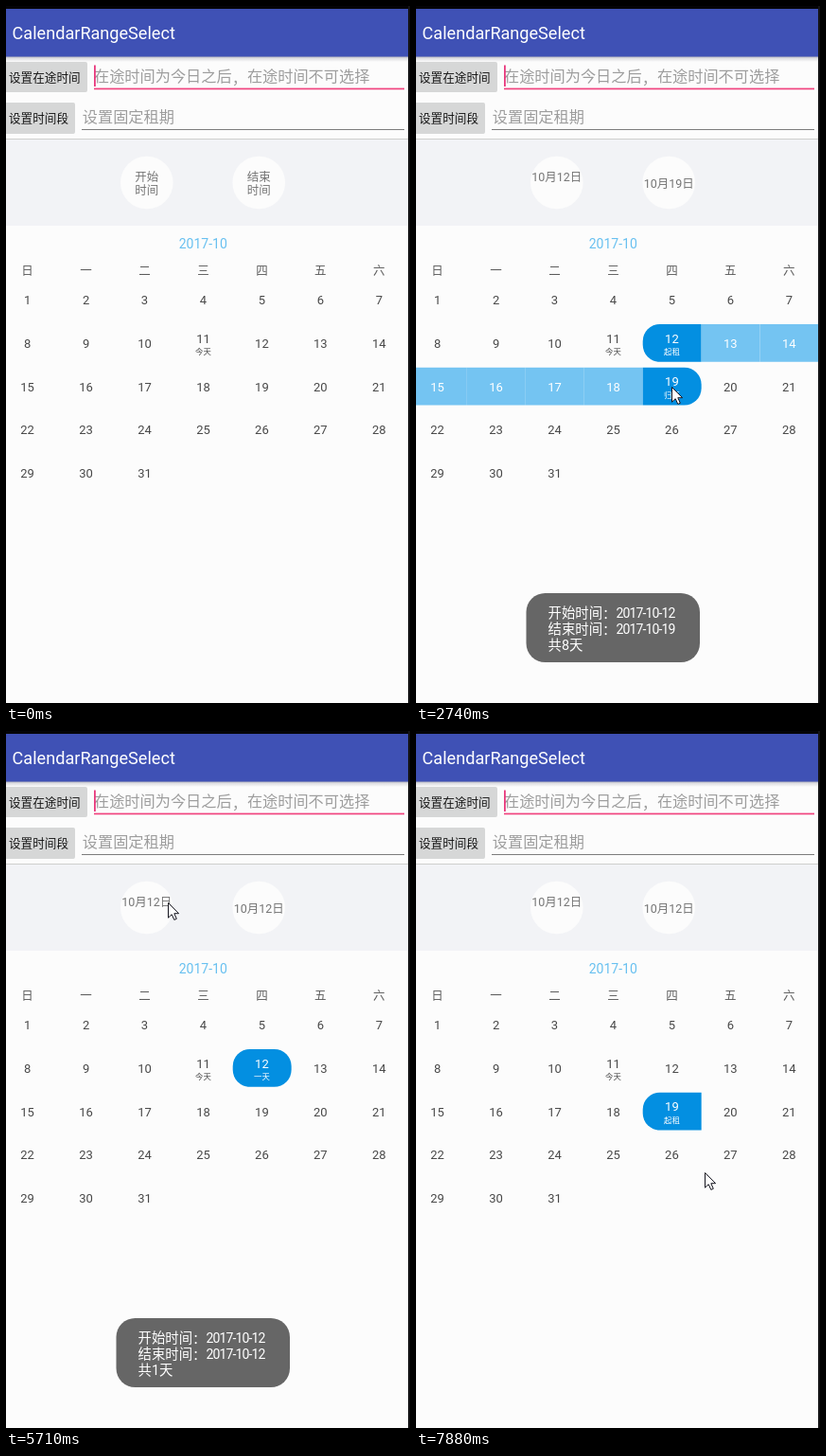
These frames come from a looping animation (427 px wide and 736 px high, 8 s). An HTML page:

```html
<!DOCTYPE html>
<html lang="zh-CN">
<head>
<meta charset="utf-8">
<title>CalendarRangeSelect</title>
<style>
html, body { margin: 0; width: 100%; height: 100%; overflow: hidden; background: #fcfcfc; }
svg { display: block; width: 427px; height: 736px; }
text { font-family: Roboto, "Noto Sans CJK SC", "Noto Sans CJK", sans-serif; white-space: pre; }
.btn { font-weight: 500; }
.date { font-size: 14px; letter-spacing: -.88px; }
.mid { font-family: "Noto Sans CJK TC", "Noto Sans CJK", sans-serif; baseline-shift: -.1em; }
</style>
</head>
<body>
<svg viewBox="0 0 427 736" xmlns="http://www.w3.org/2000/svg">
  <defs>
    <linearGradient id="shade" x2="0" y2="1">
      <stop offset="0" stop-color="#a9abb4"/>
      <stop offset=".35" stop-color="#dcdce0"/>
      <stop offset="1" stop-color="#fcfcfc"/>
    </linearGradient>
  </defs>
  <rect width="427" height="736" fill="#fcfcfc"/>
  <rect y="53" width="425" height="6" fill="url(#shade)"/>
  <rect y="3" width="425" height="50.5" fill="#3f51b5"/>
  <rect x="-4" y="59" width="90" height="32" rx="2" fill="#d6d7d7"/>
  <rect x="-4" y="102" width="77" height="33" rx="2" fill="#d6d7d7"/>
  <rect x="93" y="86.6" width="328" height="1.7" fill="#f0437f"/>
  <rect x="80" y="130" width="341" height="1" fill="#7c7c7c"/>
  <rect y="141" width="425" height="91" fill="#f2f3f6"/>
  <rect y="140" width="425" height="1" fill="#cfcfcd"/>
  <circle cx="148.8" cy="186.5" r="27.8" fill="#fcfcfc"/>
  <circle cx="267.2" cy="186.5" r="27.8" fill="#fcfcfc"/>
  <g id="labels"></g>
  <g id="bounds"></g>
  <g id="cells"></g>
  <g id="days"></g>
  <g id="toasts"></g>
  <rect id="caret" x="93" y="62.5" width="1.8" height="22.5" fill="#e8397d"/>
  <rect width="427" height="3" fill="#050508"/>
  <rect x="425" width="2" height="736" fill="#141416"/>
  <g id="pointer">
    <circle id="ring" cx="-1" cy="-.6" r="10.2" fill="#fcfcfc" fill-opacity=".7" stroke="#bcb5dd" stroke-width="1.1"/>
    <path d="M.5 .5V16.2L4.2 12.7L6.8 18.4L9.3 17.3L6.8 11.7H11.6Z" fill="#fff" stroke="#15151f"/>
  </g>
</svg>
<script>
const LOOP = 8000, PRESS = 180, GLIDE = 500, BLINK = 495;
const FADE_IN = 400, FADE_OUT = 300, TOAST_LIFE = 2060;
const $ = id => document.getElementById(id);

const taps = [
  { at: 1290, day: 12 }, { at: 2310, day: 19 }, { at: 4020, day: 12 },
  { at: 4300, day: 12 }, { at: 6680, day: 20 }, { at: 7600, day: 19 }
];

// Where the pointer comes to rest, and when it gets there
const stops = [
  { at: 400, x: 349, y: 504 }, { at: 1100, x: 270, y: 358 }, { at: 2100, x: 268, y: 400 },
  { at: 2740, x: 270, y: 402 }, { at: 3600, x: 270, y: 359 }, { at: 5710, x: 171, y: 181 },
  { at: 6250, x: 335, y: 401 }, { at: 7475, x: 275, y: 401 }, { at: 7880, x: 305, y: 466 }
];

// A tap closes an open range, unless it lies before the start
const states = [{ at: 0 }];
for (const { at, day } of taps) {
  const { from, to, range } = states[states.length - 1];
  const closes = from && !to && day >= from;
  states.push(closes ? { at, from, to: day, range: [from, day] } : { at, from: day, range });
}

const clamp = v => Math.min(1, Math.max(0, v));
const ease = k => k * k * (3 - 2 * k);
const colX = c => 22.6 + 61.95 * c;
const rowY = r => 310.3 + 45.8 * r;
const place = day => [colX((day - 1) % 7), rowY(Math.floor((day - 1) / 7))];

function text(x, y, size, str, fill, anchor = 'middle', cls = '') {
  const body = String(str).replace(/[，：]/g, '<tspan class="mid">$&</tspan>');
  return `<text x="${x}" y="${y + size * .36}" font-size="${size}" fill="${fill}" text-anchor="${anchor}" class="${cls}">${body}</text>`;
}

function cell(day, left, right, fill) {
  const [cx, cy] = place(day), x = cx - 30.7, y = cy - 20.2, w = 61.95, h = 39.9;
  return `<path fill="${fill}" d="M${x + left} ${y}H${x + w - right}a${right} ${right} 0 0 1 ${right} ${right}` +
    `V${y + h - right}a${right} ${right} 0 0 1 ${-right} ${right}H${x + left}` +
    `a${left} ${left} 0 0 1 ${-left} ${-left}V${y + left}a${left} ${left} 0 0 1 ${left} ${-left}Z"/>`;
}

function drawDays({ from, to }) {
  let cells = '', out = '';
  for (let day = 1; day <= 31; day++) {
    const [x, y] = place(day);
    const first = day === from, end = day === to, inside = day > from && day < to;
    let sub = day === 11 ? '今天' : '';
    if (first) sub = end ? '一天' : '起租';
    else if (end) sub = '归还';
    if (first || end) cells += cell(day, first ? 18 : 0, end ? 18 : 0, '#038fe1');
    else if (inside) cells += cell(day, 0, 0, '#74c4f2');
    const fill = first || end || inside ? '#fff' : '#484848';
    out += text(x, sub ? y - 5.2 : y, 13, day, fill);
    if (sub) out += text(x, y + 8.7, 8.4, sub, fill);
  }
  $('cells').innerHTML = cells;
  $('days').innerHTML = out;
}

function drawBounds({ range }) {
  const small = (x, y, str) => text(x, y, 12.5, str, '#757575');
  const prompt = (x, word) => small(x, 180.3, word) + small(x, 194.5, '时间');
  $('bounds').innerHTML = range
    ? small(148.8, 180.3, `10月${range[0]}日`) + small(267.2, 187.3, `10月${range[1]}日`)
    : prompt(148.8, '开始') + prompt(267.2, '结束');
}

function toast({ from, to }) {
  const line = (y, str) => text(139.5, y, 14.4, str, '#fff', 'start');
  const date = day => `<tspan class="date">2017-10-${day}</tspan>`;
  return '<g><rect x="116.5" y="620" width="183.5" height="73" rx="20" fill="#666"/>' +
    line(640.8, '开始时间：' + date(from)) + line(657.6, '结束时间：' + date(to)) +
    line(674.4, `共${to - from + 1}天`) + '</g>';
}

$('labels').innerHTML =
  text(6.6, 28.5, 18.1, 'CalendarRangeSelect', '#fff', 'start') +
  text(3, 75.3, 12.6, '设置在途时间', '#161616', 'start', 'btn') +
  text(3, 118.7, 12.6, '设置时间段', '#161616', 'start', 'btn') +
  text(93, 74.3, 16.2, '在途时间为今日之后，在途时间不可选择', '#9d9d9d', 'start') +
  text(80.8, 117.5, 16.2, '设置固定租期', '#9d9d9d', 'start') +
  text(208.3, 251.3, 14, '2017-10', '#68c0f0') +
  [...'日一二三四五六'].map((s, i) => text(colX(i), 279, 12.5, s, '#5c5c5c')).join('');

const ranges = states.filter(s => s.to);
$('toasts').innerHTML = ranges.map(toast).join('');

function movePointer(t) {
  const i = stops.findIndex(s => s.at > t);
  const b = stops[i < 0 ? stops.length - 1 : i], a = stops[i - 1] || b;
  const span = Math.min(GLIDE, b.at - a.at) || 1;
  const k = ease(clamp(1 - (b.at - t) / span));
  const mix = key => Math.round(a[key] + (b[key] - a[key]) * k);
  $('pointer').setAttribute('transform', `translate(${mix('x')} ${mix('y')})`);
}

const show = (id, on) => $(id).style.display = on ? '' : 'none';

let current;
function render(t) {
  const state = states.filter(s => s.at <= t).pop();
  if (state !== current) {
    drawDays(state);
    drawBounds(state);
    current = state;
  }

  ranges.forEach(({ at }, i) => {
    const age = t - at;
    $('toasts').children[i].setAttribute('opacity',
      clamp(age / FADE_IN) * (1 - clamp((age - TOAST_LIFE) / FADE_OUT)));
  });

  movePointer(t);
  show('pointer', t >= stops[0].at);
  show('ring', taps.some(({ at }) => t >= at - PRESS && t < at));
  show('caret', Math.floor((t - 120) / BLINK) % 2);
}

const start = performance.now();
function tick() {
  render((performance.now() - start) % LOOP);
  requestAnimationFrame(tick);
}
tick();
</script>
</body>
</html>
```
